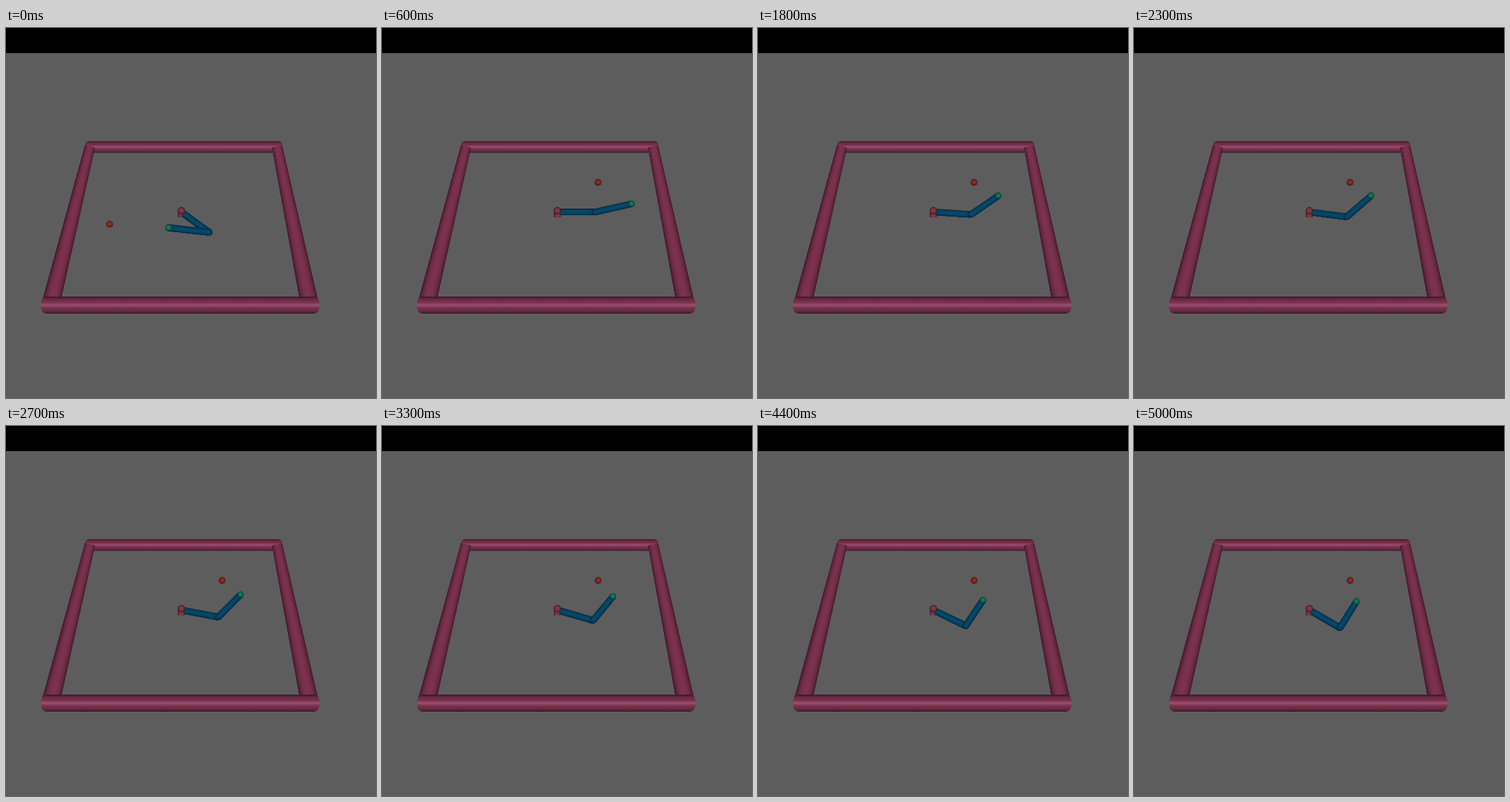
Animation, 500 px wide and 500 px high, one loop 5100 ms. Source, as an HTML page with a canvas:

```html
<!DOCTYPE html>
<html>
<head>
<meta charset="utf-8">
<title>Two-link reacher</title>
<style>
html, body { margin: 0; width: 100%; height: 100%; overflow: hidden; background: #000; }
canvas { display: block; width: 500px; height: 500px; }
</style>
</head>
<body>
<canvas id="stage" width="500" height="500"></canvas>
<script>
const ctx = document.getElementById('stage').getContext('2d');
const LOOP = 5100, STEP = 100;
const LINK1 = 0.1, LINK2 = 0.105, ARM_RADIUS = 0.0088;

const WALL = [124, 50, 79], STEEL = [8, 72, 106], BASE = [132, 57, 72];
const GREEN = [14, 124, 94], RED = [150, 42, 34];

// Colour of a round surface at u = -1..1 across it, with an optional highlight
function shade(base, u, gloss = 0) {
  const diffuse = 0.32 + 0.68 * Math.sqrt(Math.max(0, 1 - u * u));
  const shine = gloss * Math.exp(-((u / 0.2) ** 2));
  return `rgb(${base.map(c => Math.round(c * diffuse + shine)).join()})`;
}

function ball([x, y], r, base) {
  const g = ctx.createRadialGradient(x, y - 0.2 * r, 0, x, y, r);
  for (let u = 0; u <= 1; u += 0.25) g.addColorStop(u, shade(base, u));
  ctx.fillStyle = g;
  ctx.beginPath();
  ctx.arc(x, y, r, 0, 7);
  ctx.fill();
}

// Horizontal wall with rounded ends
function bar(x1, x2, y, r) {
  const g = ctx.createLinearGradient(0, y - r, 0, y + r);
  for (let u = -1; u <= 1; u += 0.125) g.addColorStop((u + 1) / 2, shade(WALL, u, 28));
  ctx.fillStyle = g;
  ctx.beginPath();
  ctx.roundRect(x1, y - r, x2 - x1, 2 * r, r * 0.7);
  ctx.fill();
}

// Tapered cylinder from a to b, built of overlapping strips
function tube(a, ra, b, rb, base, n = 14) {
  const dx = b[0] - a[0], dy = b[1] - a[1], len = Math.hypot(dx, dy);
  const edge = (p, r, u) => ctx.lineTo(p[0] - dy / len * r * u, p[1] + dx / len * r * u);
  for (let i = 0; i < n; i++) {
    const u = 2 * i / n - 1;
    ctx.beginPath();
    edge(a, ra, u);
    edge(b, rb, u);
    edge(b, rb, 1);
    edge(a, ra, 1);
    ctx.fillStyle = shade(base, u + 1 / n);
    ctx.fill();
  }
}

function arena() {
  ctx.fillStyle = '#000';
  ctx.fillRect(0, 0, 500, 34);
  ctx.fillStyle = '#5d5d5d';
  ctx.fillRect(0, 34, 500, 466);

  bar(106.5, 373.5, 160.7, 7.8);
  for (const side of [-1, 1]) {
    tube([240 + side * 126.4, 160], 6.9, [235.5 + side * 175.2, 374], 12.2, WALL);
  }
  bar(47.5, 423.5, 374.5, 11.5);
}

// Ground plane to screen, with the scale in pixels per unit
function project(x, y) {
  const scale = 1 / (0.00197 + 0.0011 * y);
  return [237 + x * scale, 1.321 * scale - 422, scale];
}

const along = ([x, y], angle, d) => [x + d * Math.cos(angle), y + d * Math.sin(angle)];

function link(a, b) {
  // Left to right, so the strips always run from top to bottom
  const [p, q] = a[0] < b[0] ? [a, b] : [b, a];
  tube(p, p[2] * ARM_RADIUS, q, q[2] * ARM_RADIUS, STEEL, 10);
}

function arm({ shoulder, heading }) {
  const a = shoulder * Math.PI / 180, b = heading * Math.PI / 180;
  const joint = along([0, 0], a, LINK1);
  const root = project(...along([0, 0], a, 0.008));
  const elbow = project(...joint);
  const tip = project(...along(joint, b, LINK2));

  tube([237, 246], 4.8, [237, 255.5], 4.8, BASE);
  link(root, elbow);
  ball(elbow, elbow[2] * ARM_RADIUS, STEEL);
  link(elbow, tip);
  ball([237, 247], 4.9, BASE);
  ball(tip, tip[2] * ARM_RADIUS, GREEN);
}

const smooth = k => k * k * (3 - 2 * k);

// The forearm settles exponentially while the shoulder swings down slowly
function pose(t) {
  if (t < STEP) return { goal: [140, 265], shoulder: -44.7, heading: 171.8 };
  return {
    goal: [292, 208.7],
    shoulder: -40 * smooth(Math.max(0, (t - 700) / 4950)),
    heading: 66.5 * (1 - Math.exp(-(t - STEP) / 1750))
  };
}

function draw(t) {
  const now = pose(t);
  arena();
  ball(now.goal, 4.6, RED);
  arm(now);
}

const start = performance.now();
let shown = -1;
function tick() {
  const t = Math.floor((performance.now() - start) % LOOP / STEP) * STEP;
  if (t !== shown) draw(shown = t);
  requestAnimationFrame(tick);
}
tick();
</script>
</body>
</html>
```
